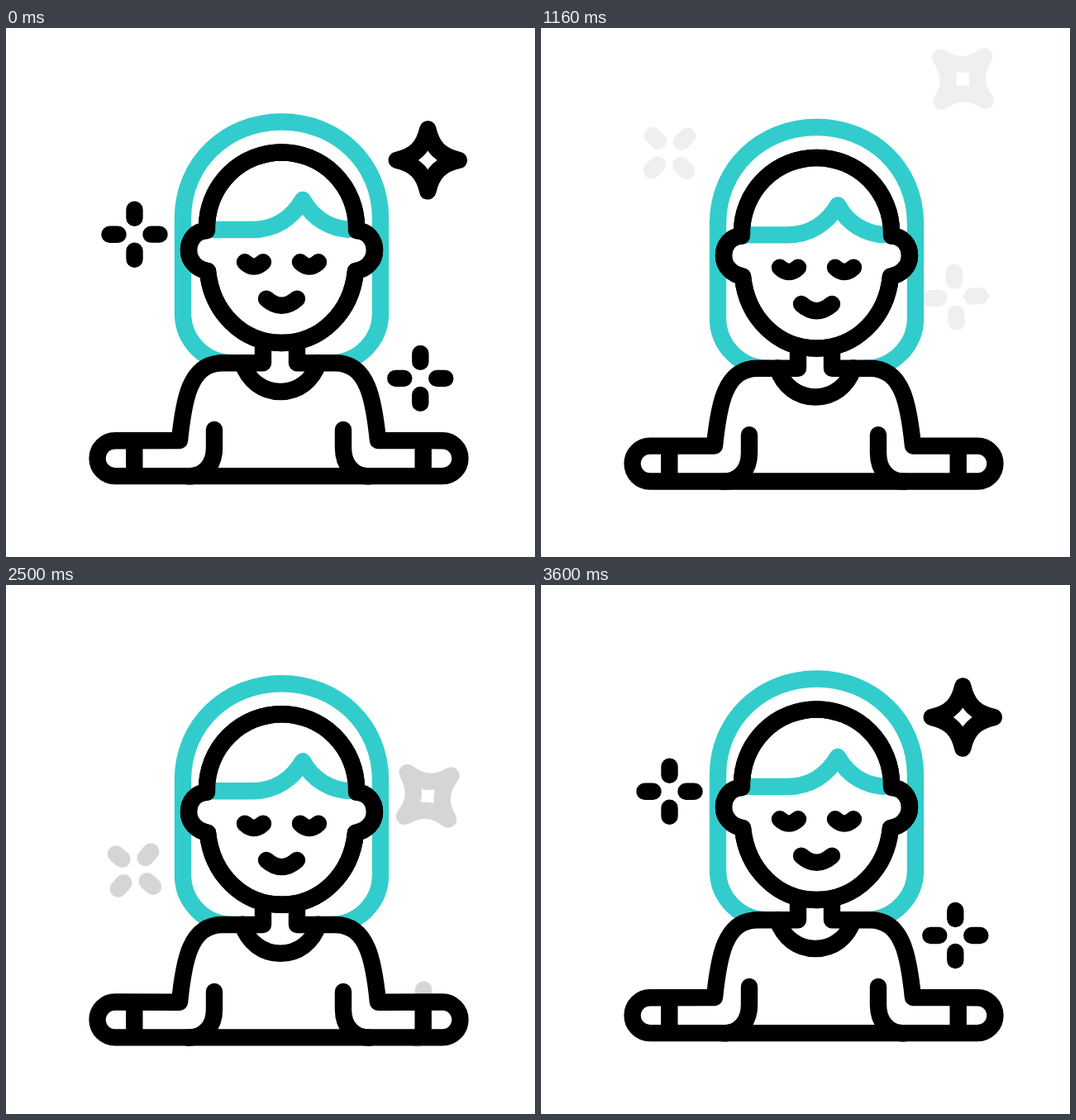
An HTML page that plays this animation: 640x640 px, repeating every 3.62 s.

```html
<!DOCTYPE html>
<html lang="en">
<head>
<meta charset="utf-8">
<title>Relaxing</title>
<style>
  html, body { margin: 0; width: 100%; height: 100%; overflow: hidden; background: #fff; }
  svg { display: block; width: 100vw; height: 100vh; }
  path { fill: none; stroke: #000; stroke-width: 20.4; stroke-linecap: round; stroke-linejoin: round; }
  .teal { stroke: #3cc; }
  .solid { fill: #fff; }
  .flat { stroke-linecap: butt; }
</style>
</head>
<body>
<svg viewBox="0 0 640 640">
  <defs>
    <path id="plus" d="M0-20V-30M0 20V30M-20 0H-30M20 0H30"/>
    <path id="star" d="M0-37.5C5-15.5 15.5-5 37.5 0C15.5 5 5 15.5 0 37.5C-5 15.5-15.5 5-37.5 0C-15.5-5-5-15.5 0-37.5Z"/>
  </defs>
  <g id="sparks">
    <use href="#plus"/>
    <use href="#star"/>
    <use href="#plus"/>
  </g>
  <path id="hair" class="teal"/>
  <path id="body" class="solid"/>
  <path id="arms"/>
  <path id="cuffs" class="flat" d="M155.3 499V542M504.7 499V542"/>
  <path id="collar" d="M286 405C293 427 311 440 332 440S371 427 378 405"/>
  <path id="skin" class="solid"/>
  <path id="fringe" class="teal flat" d="M247 244H298C325 244 346 230 359 208C371 230 392 243 417 244"/>
  <path id="head"/>
  <path id="face" d="M289 283.3Q300 294 311 283.3M356 283.3Q367 294 378 283.3M315 327.6Q333.5 344 352 327.6"/>
</svg>
<script>
const LOOP = 3620, STEP = 600, RISE = 1200, BACK = 2400, END = 3600;
const el = id => document.getElementById(id);
const set = (id, d) => el(id).setAttribute('d', d);
const shift = (id, y) => el(id).setAttribute('transform', `translate(0 ${y})`);

const headPath =
  'M243 245C230 245 221 256 221 269C221 282 231 292 244 294' +
  'C249 344 286 381 333.5 381S418 344 423 294' +
  'C436 292 446 282 446 269C446 256 437 245 424 245' +
  'V241A90.5 90.5 0 0 0 243 241Z';
set('skin', headPath);
set('head', headPath);

// x, y and total turn over each half of the flight
const sparks = [[155.5, 249.8, -45], [510.3, 160, 45], [501.3, 424, 90]];

// Breathing: rest, then low and high in turn, back to rest
function breath(t) {
  const keys = ['rest', 'lo', 'hi', 'lo', 'hi', 'lo', 'rest'];
  const i = Math.min(5, Math.floor(t / STEP));
  const p = Math.min(1, t / STEP - i);
  const e = (1 - Math.cos(Math.PI * p)) / 2;
  return (rest, lo, hi) => {
    const v = { rest, lo, hi };
    return v[keys[i]] + (v[keys[i + 1]] - v[keys[i]]) * e;
  };
}

function drawSparks(t) {
  const leaving = t < RISE;
  const away = leaving ? t / RISE : Math.min(1, Math.max(0, (END - t) / RISE));
  const dir = leaving ? 1 : -1;
  const dy = -dir * 100 * (1.48 * away - 0.48 * away * away);
  const alpha = t >= RISE && t <= BACK ? 0 : Math.min(1, 2 - 2 * away);
  el('sparks').setAttribute('opacity', alpha);
  sparks.forEach(([x, y, turn], i) => {
    el('sparks').children[i].setAttribute('transform',
      `translate(${x} ${y + dy}) rotate(${dir * turn * away})`);
  });
}

function draw(t) {
  const mix = breath(t);
  const s = mix(0, -6.1, 6.6);
  const h = mix(0, -12.4, 6.6);
  const tip = mix(486, 487.2, 492.3);
  const bend = mix(508, 506, 514);
  const r = mix(60, 46, 61);

  const top = 499.2 + h, low = 542.1 + h;
  const neck = 405.3 + s, elbow = 499 + s;
  const k = r * 0.45;

  set('hair',
    `M${214 + r} ${neck}C${214 + k} ${neck} 214 ${neck - k} 214 ${neck - r}` +
    `V${230 + s}C214 ${163 + s} 267 ${113.5 + s} 333.5 ${113.5 + s}` +
    `S453 ${163 + s} 453 ${230 + s}V${neck - r}` +
    `C453 ${neck - k} ${453 - k} ${neck} ${453 - r} ${neck}`);

  set('body',
    `M311 ${384 + s}V${neck}H262C222 ${neck} 215 ${450 + s} 210 ${elbow}` +
    `L132 ${top}A21.45 21.45 0 0 0 132 ${low}H528A21.45 21.45 0 0 0 528 ${top}` +
    `L450 ${elbow}C445 ${450 + s} 438 ${neck} 398 ${neck}H352V${384 + s}`);

  const q = bend + (low - bend) * 0.6;
  set('arms',
    `M252 ${tip}V${bend}C252 ${q} 240 ${low + 0.3} 220 ${low + 0.3}` +
    `M408 ${tip}V${bend}C408 ${q} 420 ${low + 0.3} 440 ${low + 0.3}`);

  for (const id of ['collar', 'skin', 'head']) shift(id, s);
  for (const id of ['cuffs', 'fringe', 'face']) shift(id, h);
  drawSparks(t);
}

function tick() {
  draw(performance.now() % LOOP);
  requestAnimationFrame(tick);
}
tick();
</script>
</body>
</html>
```
